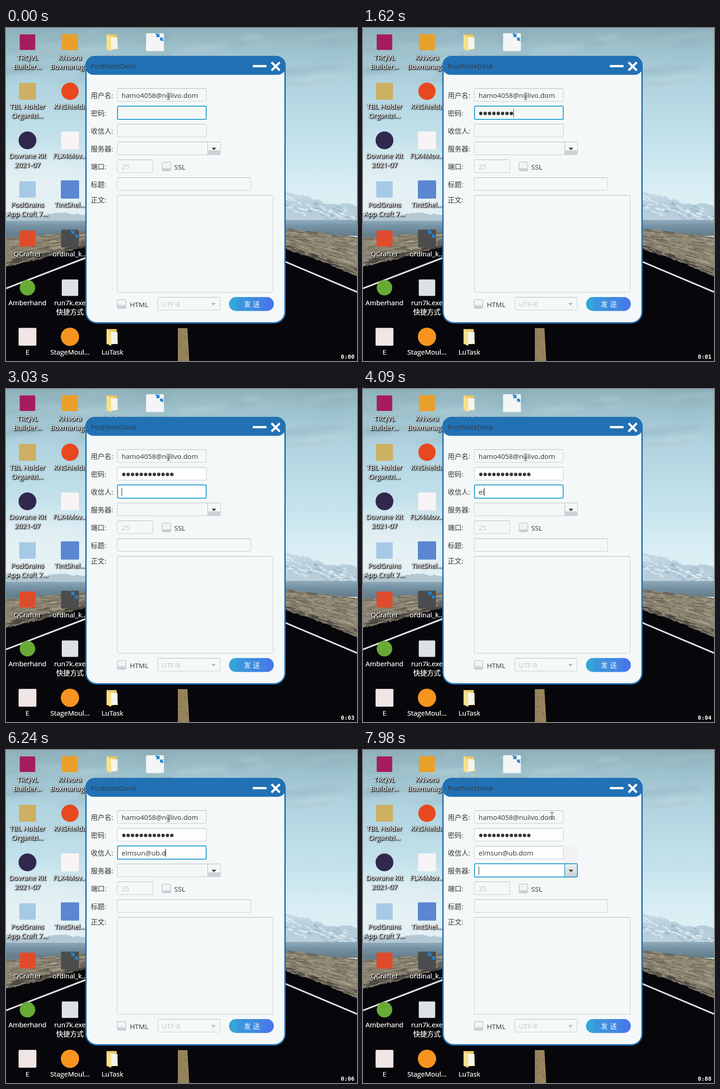
These frames come from a looping animation (768 px wide and 729 px high, 8 s). An HTML page with a canvas:

```html
<!DOCTYPE html>
<html lang="zh">
<head>
<meta charset="utf-8">
<title>PostNoteDesk</title>
<style>
html, body { margin: 0; width: 100%; height: 100%; overflow: hidden; background: #05060a; }
canvas { display: block; width: 768px; height: 729px; }
</style>
</head>
<body>
<canvas id="stage" width="768" height="729"></canvas>
<script>
const W = 768, H = 729, LOOP = 8000;
const FONT = '"Open Sans", "Noto Sans CJK SC", "Noto Sans CJK", sans-serif';
const BLUE = '#2271b5', PAPER = '#f5f8f8', INK = '#333638', FOCUS = '#26a0d0';
const USER = 'hamo4058@nulivo.dom', RECIPIENT = 'elmsun@ub.dom';

const passwordKeys = [180, 360, 610, 720, 970, 1250, 1500, 1620, 1930, 2370, 2480, 2660];
const recipientKeys = [3900, 4090, 4210, 4390, 4570, 4690, 5300, 5600, 5780, 5960, 6240, 6310, 6490];
const clockTicks = [1070, 2000, 3030, 4000, 5000, 6060, 7040, 7980];
const caretGaps = [[0, 180], [3400, 3900], [5180, 5300], [7100, 7660]];
const mouseSteps = [7740, 7820, 7900, 7980];
const TO_RECIPIENT = 2910, TO_SERVER = 6670;

let seed = 7;
const random = () => (seed = (seed * 16807) % 2147483647) / 2147483647;
const pick = list => list[Math.floor(random() * list.length)];
const passed = (times, t) => times.filter(x => x <= t).length;

const screen = document.getElementById('stage').getContext('2d');
const backdrop = document.createElement('canvas');
backdrop.width = W;
backdrop.height = H;
let g = backdrop.getContext('2d');

function rect(x, y, w, h, color) {
  g.fillStyle = color;
  g.fillRect(x, y, w, h);
}

function poly(points, color) {
  g.fillStyle = color;
  g.beginPath();
  points.forEach(p => g.lineTo(...p));
  g.fill();
}

function rounded(x, y, w, h, r, fill, stroke, width = 1) {
  g.beginPath();
  g.roundRect(x, y, w, h, r);
  if (fill) { g.fillStyle = fill; g.fill(); }
  if (stroke) { g.strokeStyle = stroke; g.lineWidth = width; g.stroke(); }
}

function line(x1, y1, x2, y2, color, width) {
  g.strokeStyle = color;
  g.lineWidth = width;
  g.beginPath();
  g.moveTo(x1, y1);
  g.lineTo(x2, y2);
  g.stroke();
}

function ellipse(x, y, rx, ry, color, tilt = 0) {
  g.fillStyle = color;
  g.beginPath();
  g.ellipse(x, y, rx, ry, tilt, 0, Math.PI * 2);
  g.fill();
}

const circle = (x, y, r, color) => ellipse(x, y, r, r, color);

function text(s, x, y, color = INK, align = 'left', size = 15) {
  g.font = `${size}px ${FONT}`;
  g.textAlign = align;
  g.fillStyle = color;
  g.fillText(s, x, y);
}

function gradient(x1, y1, x2, y2, ...stops) {
  const fill = g.createLinearGradient(x1, y1, x2, y2);
  stops.forEach(([at, color]) => fill.addColorStop(at, color));
  return fill;
}

// Jagged line through a few points.
function ridge(points, rough) {
  const out = [];
  for (let i = 0; i + 1 < points.length; i++) {
    const [x1, y1] = points[i], [x2, y2] = points[i + 1];
    for (let x = x1; x < x2; x += 5)
      out.push([x, y1 + (y2 - y1) * (x - x1) / (x2 - x1) + (random() - 0.5) * rough]);
  }
  out.push(points[points.length - 1]);
  return out;
}

function drawSky() {
  rect(0, 0, W, 460, gradient(0, 0, 0, 440,
    [0, '#8fb1bb'], [0.12, '#9fc3ce'], [0.28, '#b0d3df'], [0.55, '#c2e1eb'], [0.8, '#d9eef4'], [1, '#e2f0f5']));
  g.save();
  g.filter = 'blur(4px)';
  for (let i = 0; i < 60; i++) {
    g.globalAlpha = 0.1 + random() * 0.15;
    ellipse(random() * W, random() * 125, 20 + random() * 60, 2 + random() * 6,
      pick(['#d3e4e8', '#7899a4']), -0.08);
  }
  g.filter = 'blur(25px)';
  g.globalAlpha = 0.5;
  ellipse(50, 345, 170, 75, '#f0f4f6');
  g.restore();
}

function drawMountains() {
  const slope = ridge([[600, 354], [622, 360], [650, 366], [690, 380], [720, 388], [745, 384], [768, 392]], 5);
  poly([...slope, [768, 450], [600, 450]],
    gradient(0, 355, 0, 430, [0, '#c9dde8'], [0.5, '#b4ccd9'], [1, '#bdd2de']));
  for (let i = 0; i < 70; i++) {
    const x = 606 + random() * 160, y = 364 + (x - 606) * 0.18 + random() * 35;
    poly([[x, y], [x + 5 + random() * 14, y + 5 + random() * 5], [x - 3, y + 3]],
      pick(['#e1edf3', '#d8e7ef', '#9db8c8']));
  }
  poly([...ridge([[0, 405], [60, 412], [120, 405], [180, 410]], 5), [180, 460], [0, 460]], '#b3c8d3');
  const lake = gradient(0, 418, 0, 452, [0, '#94afbf'], [0.5, '#7491a3'], [1, '#667f8c']);
  rect(0, 422, 180, 40, lake);
  rect(600, 420, 168, 35, lake);
}

// Grassy bank between the lake and the road; both edges slope by the given rates.
function drawBank(x, width, top, topRate, bottom, bottomRate) {
  const shades = ['#a39a84', '#8a8270', '#6c6658', '#b3ab97', '#56524a'];
  const end = x + width;
  poly([[x, top], [end, top + width * topRate], [end, bottom + width * bottomRate], [x, bottom]], '#8e8672');
  for (let i = 0; i < 420; i++) {
    const dx = random() * width, depth = random();
    const high = top + dx * topRate, low = bottom + dx * bottomRate;
    const y = high + (low - high) * depth, length = 6 + random() * 22;
    const rate = topRate + (bottomRate - topRate) * depth;
    g.globalAlpha = 0.55;
    line(x + dx, y, x + dx + length, y + length * rate, depth > 0.75 ? '#3f3d39' : pick(shades), 1 + random() * 2);
  }
  g.globalAlpha = 1;
}

function drawGround() {
  drawBank(0, 180, 460, -0.08, 526, -0.26);
  drawBank(600, 168, 438, 0.12, 480, 0.4);
  poly([...ridge([[0, 524], [90, 502], [180, 478]], 4), [600, 478],
    ...ridge([[606, 481], [690, 511], [768, 544]], 4), [768, H], [0, H]], '#06060b');
  line(0, 570, 180, 501, '#dfe3e5', 3.5);
  line(600, 507, 768, 578, '#dfe3e5', 3.5);
  poly([[376, 657], [397, 657], [401, H], [376, H]], '#95825a');
  for (let i = 0; i < 140; i++)
    rect(377 + random() * 20, 657 + random() * 72, 2, 2, pick(['#a08d63', '#877650']));
}

function folder(x, y) {
  poly([[x - 13, y - 17], [x + 9, y - 17], [x + 12, y + 16], [x - 13, y + 16]], '#edc65d');
  poly([[x - 4, y - 12], [x + 11, y - 10], [x + 11, y + 14], [x - 4, y + 17]], '#f6f4e9');
  poly([[x - 13, y - 17], [x - 3, y - 10], [x - 3, y + 20], [x - 13, y + 15]], '#f8df8d');
}

function shrinkBadge(x, y) {
  const c = '#2484d0';
  poly([[x - 9, y - 7], [x - 6, y - 9], [x - 3, y - 6], [x, y - 8], [x, y], [x - 8, y], [x - 6, y - 3]], c);
  poly([[x + 9, y + 7], [x + 6, y + 9], [x + 3, y + 6], [x + 1, y + 9], [x + 1, y + 1], [x + 9, y + 1], [x + 6, y + 3]], c);
}

// Column, row, shape, size, color, label lines.
const icons = [
  [0, 0, 'square', 34, '#a51c5c', 'TRQVL', 'Builder...'],
  [1, 0, 'square', 35, '#e9a02b', 'KNvora', 'Boxmanag...'],
  [2, 0, 'folder', 0, '', 'WORK'],
  [3, 0, 'square', 39, '#f4f5f6', 'notes.init'],
  [0, 1, 'square', 37, '#cdb062', 'TBL Holder', 'Organizi...'],
  [1, 1, 'circle', 38, '#e9481f', 'KNShielda'],
  [0, 2, 'circle', 39, '#30284f', 'Dovrane Kit', '2021-07'],
  [1, 2, 'square', 39, '#f8f4f5', 'FLX4Mov...'],
  [0, 3, 'square', 36, '#a6c9e6', 'PodGrains', 'App Craft 7...'],
  [1, 3, 'square', 40, '#5b87d0', 'TintShel...'],
  [0, 4, 'square', 35, '#df4b2d', 'QCrafter'],
  [1, 4, 'square', 39, '#4b4c4d', 'ordinal_k...'],
  [0, 5, 'circle', 34, '#68aa36', 'Amberhand'],
  [1, 5, 'square', 36, '#dce3e7', 'run7k.exe', '快捷方式'],
  [0, 6, 'square', 39, '#f0e6e5', 'E'],
  [1, 6, 'circle', 40, '#f6941f', 'StageMoul...'],
  [2, 6, 'folder', 0, '', 'LuTask'],
];

function iconLabel(s, x, y) {
  g.save();
  g.shadowColor = '#000';
  g.shadowBlur = 2.5;
  g.shadowOffsetX = g.shadowOffsetY = 1;
  for (let pass = 0; pass < 3; pass++) text(s, x, y, '#fff', 'center');
  g.restore();
}

function drawIcons() {
  for (const [col, row, shape, size, color, ...label] of icons) {
    const x = 47 + col * 93, y = 31 + row * 107.5;
    if (shape === 'folder') folder(x, y);
    else if (shape === 'circle') circle(x, y, size / 2, color);
    else rounded(x - size / 2, y - size / 2, size, size, 2, color);
    label.forEach((s, i) => iconLabel(s, x, y + 38.5 + i * 20));
  }
  shrinkBadge(336, 20);
  shrinkBadge(150, 451);
}

function field(x, y, w, h, fill = PAPER) {
  rounded(x + 0.5, y + 0.5, w - 1, h - 1, 2, fill, '#c2cbcc');
  line(x + 2, y + 0.5, x + w - 2, y + 0.5, '#adb8ba', 1);
}

function focusRing(x, y, w, h, fill = '#fff') {
  rounded(x + 1, y + 1, w - 2, h - 2, 2, fill, FOCUS, 2);
}

function arrow(x, y, color) {
  poly([[x - 5, y - 2], [x + 5, y - 2], [x, y + 3.5]], color);
}

function checkbox(x, y) {
  rounded(x + 0.5, y + 0.5, 19, 19, 2, '#f1f4f5', '#aab4b6');
  rect(x + 1.5, y + 14, 17, 5, '#ccd3d5');
}

function drawWindow() {
  rounded(173.5, 61, 438.5, 586, [21, 21, 25, 25], BLUE);
  rounded(176.5, 84, 432.5, 560, [0, 0, 22, 22], PAPER);
  rounded(173.5, 61, 438.5, 41.5, [21, 21, 18, 18], BLUE);
  text('PostNoteDesk', 185.5, 89, '#2f3a43');
  rect(540, 81, 30, 5, '#fff');
  line(581, 75, 599, 93, '#fff', 4.6);
  line(599, 75, 581, 93, '#fff', 4.6);

  ['用户名:', '密码:', '收信人:', '服务器:', '端口:', '标题:'].forEach((s, i) => text(s, 185.5, 152.5 + i * 39));
  text('正文:', 185.5, 382);

  field(243, 132, 196, 29);
  field(243, 171, 196, 29);
  field(243, 210, 196, 29);
  field(243, 249, 227, 29);
  rect(441, 250, 1, 27, '#aeb8ba');
  rect(442.5, 268, 26, 9, '#cbd3d5');
  arrow(455, 264, '#3b3f41');

  field(243, 288, 79, 29);
  text('25', 253, 308.5, '#bfc6c8');
  checkbox(341, 293);
  text('SSL', 368, 309.5);
  field(243, 327, 293, 29);
  field(243, 366, 342, 213);

  checkbox(243, 594);
  for (let x = 245; x < 262; x += 4) rect(x, 606, 2, 3, '#ccd3d5');
  text('HTML', 271, 610.5);
  field(332, 589, 137, 29);
  text('UTF-8', 341, 609.5, '#c2c8ca');
  arrow(454, 604, '#b3bbbd');

  rounded(488, 589, 98, 30.5, 15, gradient(488, 0, 586, 0,
    [0, '#35a5d9'], [0.17, '#35a5d9'], [0.17, '#3a98dc'], [0.5, '#3f8de0'], [0.83, '#447fe5'], [0.83, '#4877e9'], [1, '#4877e9']));
  text('发', 520.5, 610, '#fff');
  text('送', 540.5, 610, '#fff');
}

function drawCaret(x, y, t) {
  if (!caretGaps.some(([a, b]) => t >= a && t < b)) rect(Math.round(x), y, 1, 18, '#222');
}

function drawPassword(t) {
  const count = passed(passwordKeys, t), pitch = 9.55;
  if (t < TO_RECIPIENT) focusRing(243, 170, 196, 31, PAPER);
  else field(243, 171, 196, 29, '#fdfefe');
  for (let i = 0; i < count; i++) circle(253 + pitch * (i + 0.5), 187, 3.7, INK);
  if (t < TO_RECIPIENT) drawCaret(252.7 + pitch * count, 177, t);
}

function drawRecipient(t) {
  if (t < TO_RECIPIENT) return;
  const typed = RECIPIENT.slice(0, passed(recipientKeys, t));
  const active = t < TO_SERVER;
  if (active) {
    focusRing(243, 209, 196, 31);
  } else {
    rect(439, 209, 31, 40, '#f2f2f4');
    field(243, 210, 196, 29, '#fdfefe');
  }
  text(typed, 253, 230.5);
  if (active) drawCaret(252.5 + g.measureText(typed).width, 216, t);
}

function drawServer(t) {
  if (t < TO_SERVER) return;
  focusRing(243, 248, 227, 31);
  rect(441, 250, 27, 27, gradient(0, 250, 0, 277, [0, '#eef1f2'], [1, '#c9d1d4']));
  rect(440.5, 250, 1.5, 27, FOCUS);
  arrow(455, 264, '#3b3f41');
  drawCaret(253, 255, t);
}

function drawMouse(t) {
  const p = passed(mouseSteps, t) / mouseSteps.length;
  const x = Math.round(355 + 58 * p), y = Math.round(149 - 6 * p);
  rect(x, y - 6, 1, 13, '#222');
  for (const end of [-7, 7]) {
    rect(x - 3, y + end, 3, 1, '#222');
    rect(x + 1, y + end, 3, 1, '#222');
  }
}

function drawClock(t) {
  const label = '0:0' + passed(clockTicks, t);
  g.font = 'bold 12.5px "DejaVu Sans Mono", monospace';
  g.textAlign = 'left';
  g.strokeStyle = '#000';
  g.lineWidth = 2;
  g.strokeText(label, 732.5, 724);
  g.fillStyle = '#fff';
  g.fillText(label, 732.5, 724);
}

drawSky();
drawMountains();
drawGround();
drawIcons();
drawWindow();
g = screen;

function frame() {
  const t = performance.now() % LOOP;
  g.drawImage(backdrop, 0, 0);
  text(USER, 253, 152.5);
  drawPassword(t);
  drawRecipient(t);
  drawServer(t);
  drawMouse(t);
  drawClock(t);
  requestAnimationFrame(frame);
}
frame();
</script>
</body>
</html>
```
